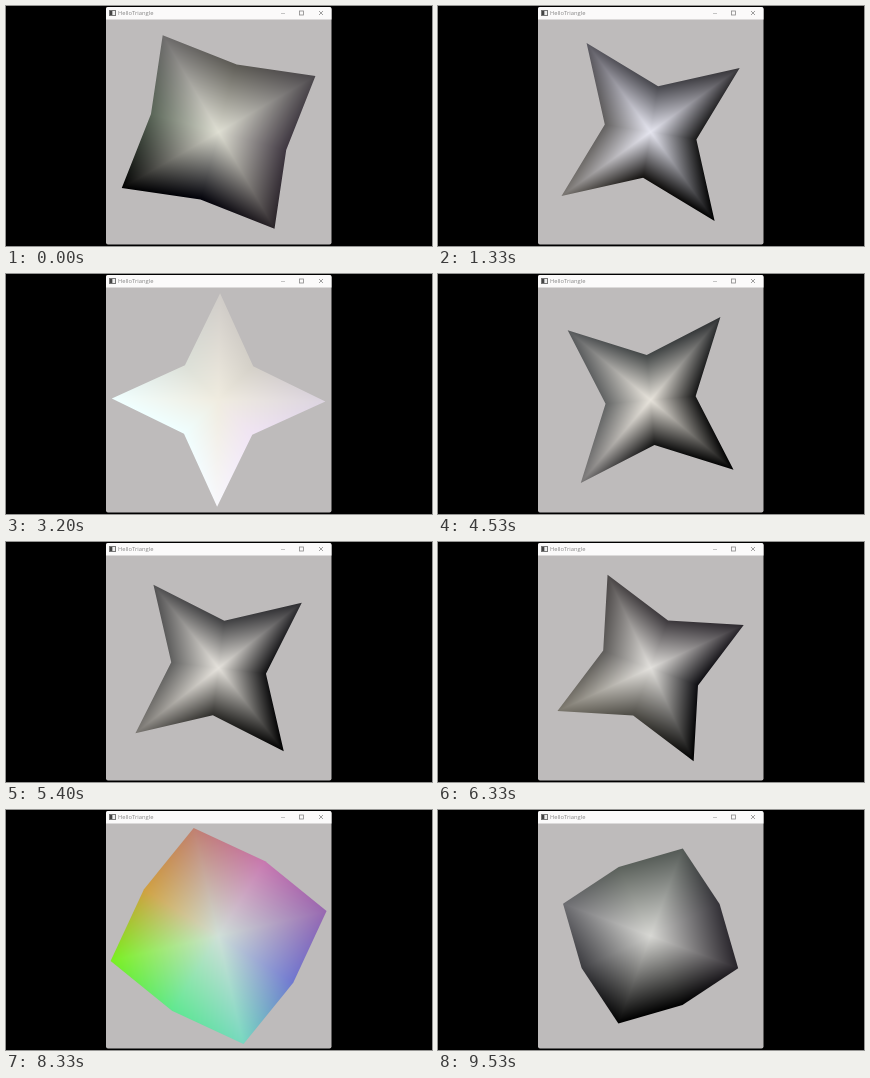
Animation of 426 by 240 pixels, one loop 9.59 s. Source, as an HTML page with a canvas:

```html
<!DOCTYPE html>
<html lang="en">
<head>
<meta charset="utf-8">
<title>HelloTriangle</title>
<style>
html, body { margin: 0; width: 100%; height: 100%; overflow: hidden; background: #000; }
canvas { display: block; width: 426px; height: 240px; }
</style>
</head>
<body>
<canvas id="stage" width="426" height="240"></canvas>
<script>
const LOOP = 9590;
const FPS = 15;
const CENTER = { x: 212.6, y: 126 };
const HALF = 113;
const SIZE = HALF * 2;

// Rotation in degrees, outer and inner radius, center color,
// then the eight rim colors clockwise, starting at an outer tip.
const pose = (step, angle, outer, inner, core, rim) => ({
  step, values: [angle, outer, inner],
  colors: [core, ...rim.split(' ')].map(hex =>
    [0, 2, 4].map(i => parseInt(hex.slice(i, i + 2), 16)))
});

const poses = [
  pose(0, 150, 111.8, 70, 'e0e0d4',
    '000000 5a6658 6e6c6c 5c5a54 4c484c 3e3640 2a2428 000008'),
  pose(20, 54.3, 109.7, 46.4, 'e6e6f0',
    '000000 100e0c 787470 62605f 5a5860 46464c 38363a 181818'),
  pose(48, 90.8, 106.8, 48.3, 'f0ece0',
    'f8f8fc f0ffff f0ffff dce0d8 d0ccc8 d4d0c8 dcd4e0 f0e4f4'),
  pose(68, 40.1, 108.4, 45.2, 'e8e4dc',
    '000000 101010 7a7878 626464 585a5c 424646 303234 141414'),
  pose(95, 65.2, 102.6, 50.5, 'e4e2de',
    '000000 4c4a44 7a766c 5e5c5a 4c4848 3c383c 2c282e 0c0c10'),
  pose(125, 77, 110.8, 88, 'd0e0d8',
    '78d8c0 60e890 78f020 d0a040 c08070 c878b0 9868b0 7078d0'),
  pose(143, 110.2, 93.3, 76, 'd8d8d4',
    '000000 3c3c40 6c6c70 5c625c 545a56 343238 28242a 000000')
];

const ctx = document.getElementById('stage').getContext('2d');
const shade = document.createElement('canvas');
shade.width = shade.height = SIZE;
const shadeCtx = shade.getContext('2d');
const pixels = shadeCtx.createImageData(SIZE, SIZE);

const mix = (a, b, k) => a + (b - a) * k;
const mixAll = (a, b, k) => a.map((v, i) => mix(v, b[i], k));

function poseAt(step) {
  let i = 0;
  while (i < poses.length - 2 && step >= poses[i + 1].step) i++;
  const a = poses[i], b = poses[i + 1];
  const part = (step - a.step) / (b.step - a.step);
  const k = (1 - Math.cos(Math.PI * part)) / 2;
  return {
    values: mixAll(a.values, b.values, k),
    colors: a.colors.map((c, n) => mixAll(c, b.colors[n], k))
  };
}

function rect(color, x, y, w, h) {
  ctx.fillStyle = color;
  ctx.fillRect(x, y, w, h);
}

function drawWindow() {
  rect('#000', 0, 0, 426, 240);
  ctx.fillStyle = '#bebbbb';
  ctx.beginPath();
  ctx.roundRect(100, 1, 225.5, 237.5, 2);
  ctx.fill();
  ctx.fillStyle = '#fbfafa';
  ctx.beginPath();
  ctx.roundRect(100, 1, 225.5, 12.5, [2, 2, 0, 0]);
  ctx.fill();

  rect('#777', 103, 4, 7, 6);
  rect('#eee', 106.5, 5, 2.5, 4);
  rect('#444', 104, 5, 2, 4);

  ctx.fillStyle = '#858585';
  ctx.font = '5.8px "Open Sans", sans-serif';
  ctx.fillText('HelloTriangle', 112, 9.3);

  rect('#c4c4c4', 275, 7, 4, 1);
  ctx.strokeStyle = '#888';
  ctx.lineWidth = 0.8;
  ctx.strokeRect(293.5, 5, 4, 4);
  ctx.beginPath();
  ctx.moveTo(313, 5);
  ctx.lineTo(317, 9);
  ctx.moveTo(317, 5);
  ctx.lineTo(313, 9);
  ctx.stroke();
}

// Blends each wedge linearly between the center and two rim corners.
function shadeStar(points, colors, turn) {
  const [core, ...rim] = colors;
  const wedges = points.map((a, i) => {
    const j = (i + 1) % 8, b = points[j];
    return { a, b, det: a.x * b.y - a.y * b.x, from: rim[i], to: rim[j] };
  });
  let at = 0;
  for (let row = 0; row < SIZE; row++) {
    for (let col = 0; col < SIZE; col++) {
      const x = col + 0.5 - HALF, y = row + 0.5 - HALF;
      const sector = Math.floor((Math.atan2(y, x) - turn) / (Math.PI / 4));
      const w = wedges[((sector % 8) + 8) % 8];
      const u = (x * w.b.y - y * w.b.x) / w.det;
      const v = (w.a.x * y - w.a.y * x) / w.det;
      for (let c = 0; c < 3; c++) {
        pixels.data[at++] = core[c] + u * (w.from[c] - core[c]) + v * (w.to[c] - core[c]);
      }
      pixels.data[at++] = 255;
    }
  }
  shadeCtx.putImageData(pixels, 0, 0);
}

function drawStar(step) {
  const { values: [angle, outer, inner], colors } = poseAt(step);
  const turn = angle * Math.PI / 180;
  const points = Array.from({ length: 8 }, (_, i) => {
    const radius = i % 2 ? inner : outer;
    const a = turn + i * Math.PI / 4;
    return { x: radius * Math.cos(a), y: radius * Math.sin(a) };
  });
  shadeStar(points, colors, turn);

  ctx.save();
  ctx.translate(CENTER.x, CENTER.y);
  ctx.beginPath();
  points.forEach(p => ctx.lineTo(p.x, p.y));
  ctx.closePath();
  ctx.clip();
  ctx.drawImage(shade, -HALF, -HALF);
  ctx.restore();
}

let shown = -1;
function frame() {
  const time = performance.now() % LOOP;
  const step = Math.min(143, Math.floor((time + 5) * FPS / 1000));
  if (step !== shown) {
    shown = step;
    drawWindow();
    drawStar(step);
  }
  requestAnimationFrame(frame);
}
frame();
</script>
</body>
</html>
```
